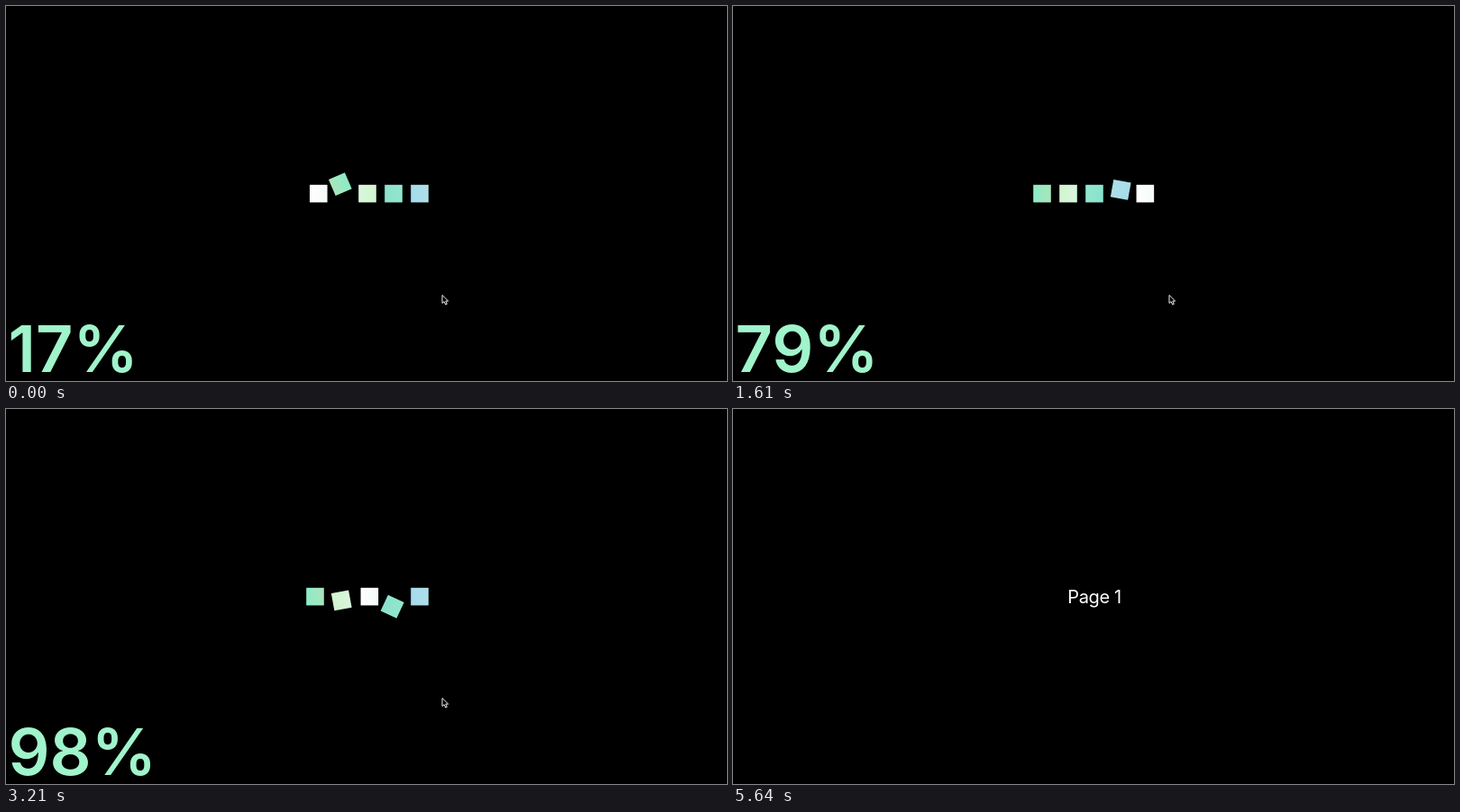
Recreate the animation shown at these times as an HTML page. Size 800 px wide and 417 px high, loop 6.45 s.

```html
<!DOCTYPE html>
<html lang="en">
<head>
<meta charset="utf-8">
<title>Loader</title>
<style>
  html, body { margin: 0; width: 100%; height: 100%; overflow: hidden; background: #000; }
  svg { display: block; width: 800px; height: 417px; }
  text { font-family: Inter, Roboto, sans-serif; font-variation-settings: "opsz" 14; }
  #count { font-size: 72px; font-weight: 600; fill: #a0f4cb; }
  #page { font-size: 20px; fill: #fff; text-anchor: middle; letter-spacing: -.4px; }
</style>
</head>
<body>
<svg viewBox="0 0 800 417">
  <defs id="defs"></defs>
  <g id="loader">
    <g id="boxes"></g>
    <text id="count" x="2.5" y="406.5"></text>
  </g>
  <text id="page" x="401" y="216">Page 1</text>
  <path id="cursor" d="M0 0V9L2.1 7.2L3.7 10.6L5.3 9.9L3.8 6.6H6.7Z" fill="#000" stroke="#eee" stroke-width="1"/>
</svg>
<script>
const LOOP = 6450, CUT = 4640, LEAVE = 5360, GONE = 5640;
const LEFT = 343, ROW = 208.6, GAP = 29, SIZE = 19.6, LIFT = 29.5;
const HOP = 1100, STAGGER = 400, FIRST_UP = 155, FIRST_DOWN = 2665;
const COLORS = [
  ['#ffffff', '#f3fbf6'],
  ['#a9e5bb', '#8cebc8'],
  ['#d9f7dc', '#d2f3cf'],
  ['#8ae2cf', '#92e6cb'],
  ['#a6dcec', '#addfe8']
];
// time, cube root of the percentage still to go
const COUNT = [[0, 4.353], [420, 3.904], [1090, 3.224], [1610, 2.737], [2550, 1.765], [CUT, 0]];

const $ = id => document.getElementById(id);
const clamp = v => Math.min(1, Math.max(0, v));

function make(tag, attrs, parent) {
  const el = document.createElementNS('http://www.w3.org/2000/svg', tag);
  for (const k in attrs) el.setAttribute(k, attrs[k]);
  return parent.appendChild(el);
}

const boxes = COLORS.map((pair, i) => {
  const grad = make('linearGradient', { id: 'g' + i }, $('defs'));
  pair.forEach((c, k) => make('stop', { offset: k, 'stop-color': c }, grad));
  return make('rect', { x: -SIZE / 2, y: -SIZE / 2, width: SIZE, height: SIZE, fill: `url(#g${i})` }, $('boxes'));
});

// cubic-bezier(.8, 0, .2, 1)
function ease(x) {
  let lo = 0, hi = 1;
  for (let i = 0; i < 20; i++) {
    const u = (lo + hi) / 2, v = 1 - u;
    if (2.4 * u * v * v + .6 * u * u * v + u * u * u < x) lo = u; else hi = u;
  }
  return lo * lo * (3 - 2 * lo);
}

const hop = (t, center) => ease(clamp((t - center) / HOP + .5));

function place(el, x, y, deg) {
  el.setAttribute('transform', `translate(${x.toFixed(2)} ${y.toFixed(2)}) rotate(${deg.toFixed(2)})`);
}

function drawBoxes(t) {
  let slid = 0;
  for (let i = 1; i < 5; i++) {
    const up = hop(t, FIRST_UP + (i - 1) * STAGGER);
    const down = hop(t, FIRST_DOWN + (4 - i) * STAGGER);
    const again = hop(t, FIRST_UP + 5020 + (i - 1) * STAGGER);
    const turn = Math.PI * (up + down + again);
    const s = Math.sin(turn);
    const x = LEFT + GAP * (i - .5 + Math.cos(turn) / 2);
    const y = ROW - LIFT * Math.sign(s) * Math.abs(s) ** 1.12;
    place(boxes[i], x, y, -turn * 180 / Math.PI);
    slid += up - down + again;
  }
  place(boxes[0], LEFT + GAP * slid, ROW, 0);
}

function percent(t) {
  const k = Math.max(1, COUNT.findIndex(p => p[0] >= t));
  const [t0, a] = COUNT[k - 1], [t1, b] = COUNT[k];
  const root = a + (b - a) * (t - t0) / (t1 - t0);
  return Math.min(99, Math.floor(100 - root ** 3));
}

function drawCursor(t) {
  $('cursor').style.display = t < GONE ? '' : 'none';
  const step = t < LEAVE ? 0 : Math.floor((t - LEAVE) / 31) + 1;
  const p = clamp(step / 9);
  place($('cursor'), 484 + 293 * p ** 1.6, 321.5 - 41 * p ** 1.3, 0);
}

function draw(t) {
  const loading = t < CUT;
  $('loader').style.display = loading ? '' : 'none';
  $('page').style.display = loading ? 'none' : '';
  if (loading) {
    drawBoxes(t);
    $('count').textContent = percent(t) + '%';
  }
  drawCursor(t);
}

const start = performance.now();
function tick() {
  draw((performance.now() - start) % LOOP);
  requestAnimationFrame(tick);
}
tick();
</script>
</body>
</html>
```
